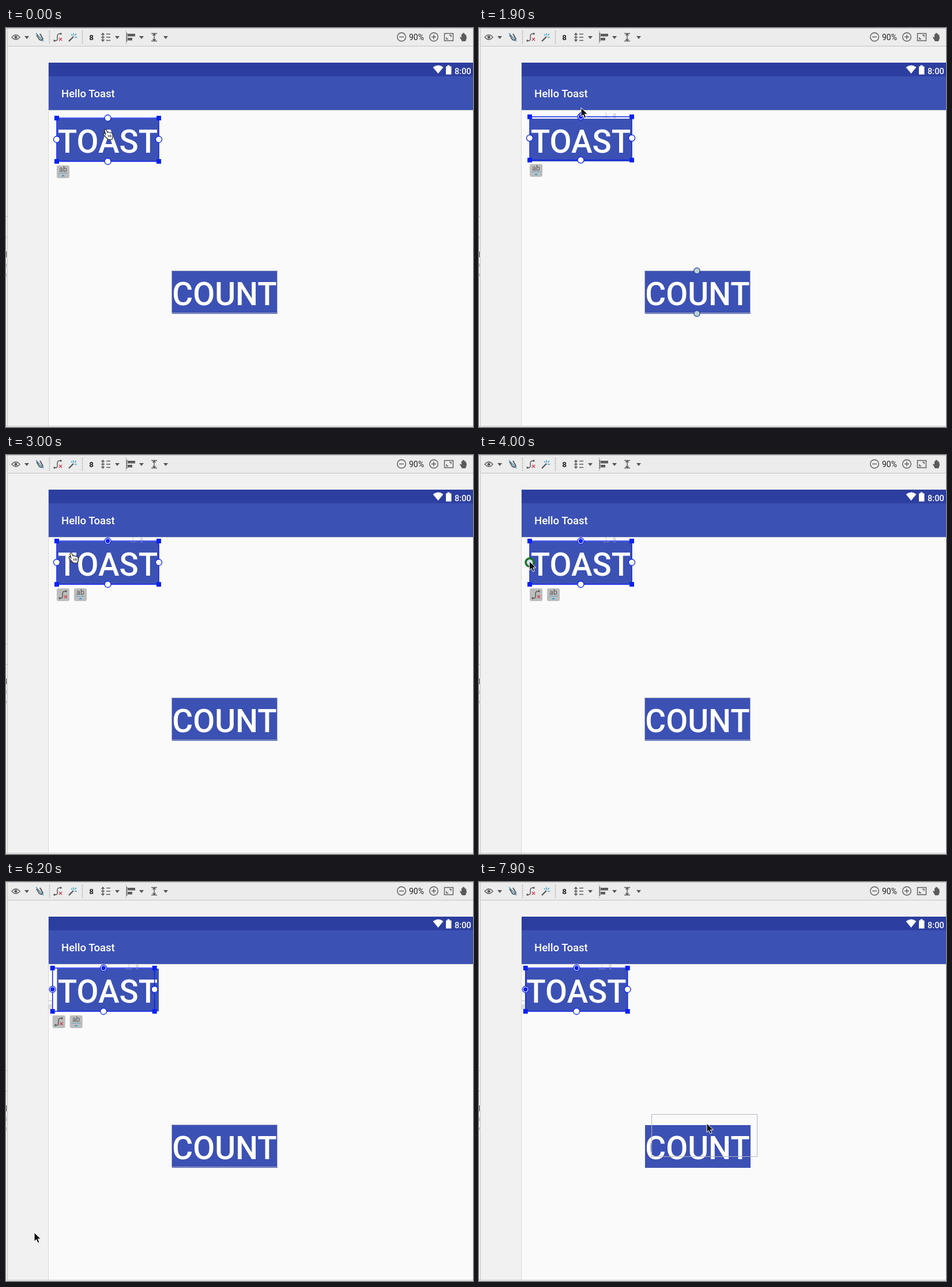
Recreate the animation shown at these times as an HTML page. Size 810 by 691 pixels, loop 8 s.

```html
<!DOCTYPE html>
<html lang="en">
<head>
<meta charset="utf-8">
<title>Layout editor</title>
<style>
  html, body { margin: 0; width: 100%; height: 100%; overflow: hidden; background: #f1f1f1; }
  svg { display: block; width: 100vw; height: 100vh; }
  text { font-family: Roboto, sans-serif; }
  .icon { fill: none; stroke: #5b5b5b; stroke-width: 1.4; }
  .dots { stroke: #777; stroke-dasharray: 1 2; }
  .label { font-size: 55px; font-weight: 500; fill: #fff; text-anchor: middle; }
  .hint { font-size: 11px; fill: #b9b9b9; text-anchor: middle; }
  .select { fill: none; stroke: #0a22f2; stroke-width: 1.5; }
</style>
</head>
<body>
<svg viewBox="0 0 810 691">
  <defs>
    <path id="caret" d="M-4 -2h8l-4 5z" fill="#555"/>
    <g id="unlink" fill="none" stroke-width="1.5">
      <path d="M-7 6h3c4 0 3-3 3-6s0-6 4-6h2" stroke="#5b5b5b"/>
      <circle cx="-6" cy="6" r="1" stroke="#5b5b5b"/><circle cx="5" cy="-6" r="1" stroke="#5b5b5b"/>
      <path d="M2 1l5 5m0-5l-5 5" stroke="#cf4457"/>
    </g>
    <g id="tile"><rect width="22" height="22" rx="3" fill="#bdbdbd"/></g>
  </defs>

  <!-- editor frame -->
  <rect width="810" height="691" fill="#f1f1f1"/>
  <rect width="810" height="31" fill="#ececec"/>
  <path d="M0 .5h810M2 31.5h808M2.5 0v690M0 689.5h810" stroke="#c4c4c4"/>
  <rect y="690" width="810" height="1" fill="#f4f4f4"/>
  <path d="M0 326.5h2M0 362.5h2" stroke="#bbb"/>
  <path d="M.5 387v10" stroke="#333"/>
  <path d="M.5 408v6M.5 425v5" stroke="#a9a9b8"/>

  <!-- toolbar -->
  <g class="icon">
    <path d="M10 16q7-8 14 0q-7 8-14 0z"/><circle cx="17" cy="16" r="1.8" fill="#5b5b5b"/>
    <path d="M53 12l5 8q4 3 6-1l-5-9M59 10l5 9" stroke-width="2"/><path d="M52 9l13 14" stroke="#3d8fb8"/>
    <path class="dots" d="M75.5 5v22M132.5 5v22M208.5 5v22"/>
    <path d="M109 23l8-8" stroke-width="2.4"/>
    <path d="M117 9v4M122 10l-3 3M119 16h4M113 11l2 2" stroke="#3d9fc4"/>
    <path d="M168 9v14M165.500 12l2.500-3 2.500 3M165.500 20l2.500 3 2.500-3M165 16h6M174 10.500h7M174 16h7M174 21.500h7"/>
    <path d="M209.500 8v16"/>
    <path d="M252 9.500h10M252 22.500h10M257 10v12M254.500 13l2.500-3 2.500 3M254.500 19l2.500 3 2.500-3"/>
    <circle cx="686" cy="15.500" r="7.300"/><path d="M682 15.500h8"/>
    <circle cx="742" cy="15.500" r="7.300"/><path d="M738 15.500h8M742 11.500v8"/>
    <rect x="760.500" y="9.500" width="15" height="12.500"/><path d="M764 16v3h3M769 12.500h3v3"/>
  </g>
  <path d="M211 10h13v4.500h-13zM211 17h8v4.500h-8z" fill="#5b5b5b"/>
  <path d="M791 23q-3-5-4-7q1-2 3 1v-6q1-1.500 2 0v-2q1-1.500 2 0v1q1-1.500 2 0v2q2-1.500 2 0l1 5q-1 4-2 6z" fill="#5b5b5b"/>
  <use href="#caret" x="36" y="16"/><use href="#caret" x="193" y="16"/>
  <use href="#caret" x="235" y="16"/><use href="#caret" x="277" y="16"/>
  <use href="#unlink" x="90" y="16"/>
  <text x="148" y="20.500" font-size="13.500" font-weight="700" text-anchor="middle" fill="#222">8</text>
  <text x="699" y="20.500" font-size="14" fill="#222">90%</text>

  <!-- device -->
  <rect x="73" y="60" width="1" height="629" fill="#d9d9d9"/>
  <rect x="74" y="60" width="736" height="629" fill="#fafafa"/>
  <rect x="74" y="60" width="736" height="24" fill="#2c3e9f"/>
  <rect x="74" y="83.500" width="736" height="58.500" fill="#3c51b4"/>
  <rect x="74" y="142" width="736" height="1" fill="#d4d4d8"/>
  <path d="M740.500 68q9.500-7 18 0l-9 11z" fill="#fff"/>
  <path d="M763 66.500h2.500v-2h4v2h3v14h-9.500z" fill="#fff"/>
  <text x="778" y="80" font-size="14.600" font-weight="500" fill="#fff">8:00</text>
  <text x="96" y="120" font-size="18.500" font-weight="500" fill="#fff">Hello Toast</text>

  <rect x="288" y="421" width="183" height="74" fill="#3c51b4"/>
  <text class="label" x="379" y="479.500">COUNT</text>
  <rect id="outline" x="287.500" y="420.500" width="183" height="73" fill="none" stroke="#b4b6c4"/>
  <g id="toast">
    <rect width="176.500" height="74" fill="#3c51b4"/>
    <text class="label" x="88" y="59">TOAST</text>
  </g>

  <!-- selection, relative to its top left corner -->
  <g id="selection">
    <g id="topMargin">
      <path d="M132.500 -7v8M127 1h11" stroke="#c4c4c4" fill="none"/>
      <text class="hint" x="147" y="2">8</text>
    </g>
    <g id="leftMargin">
      <path d="M-7 56.500h7" stroke="#c4c4c4"/>
      <text class="hint" x="-4" y="71">8</text>
    </g>
    <rect class="select" width="177" height="75"/>
    <path d="M-4 -4h8v8h-8zM173 -4h8v8h-8zM-4 71h8v8h-8zM173 71h8v8h-8z" fill="#0a22f2"/>
    <g id="handles"></g>
    <g id="actions">
      <g id="unlinkAction"><use href="#tile"/><use href="#unlink" x="11" y="11"/></g>
      <g id="textAction">
        <use href="#tile"/>
        <text x="11" y="11" font-size="12" text-anchor="middle" fill="#555">ab</text>
        <path d="M3 13.500h16" stroke="#3a9fc6" stroke-dasharray="2 1"/>
        <path d="M8 19h6l-3-3z" fill="#2b9fd0"/>
      </g>
    </g>
  </g>
  <g id="anchors" stroke="#2338b8" stroke-width="1.200">
    <g id="vertical"><circle cx="378" cy="420.500" r="5.200"/><circle cx="378" cy="494.500" r="5.200"/></g>
    <g id="horizontal"><circle cx="287" cy="457" r="5.200"/><circle cx="470.500" cy="457" r="5.200"/></g>
  </g>
  <path id="wire" class="select"/>

  <g id="cursor" stroke="#fff" stroke-linejoin="round">
    <path id="arrow" d="M0 0v15.500l3.600-3.300 2.500 5.800 2.900-1.200-2.500-5.600h5z" fill="#111"/>
    <path id="hand" d="M-2 9L-4 2q0-3 3-2l2 5 1-1 2 1 2 0 1 1 2 0q2 3 1 7l-1 4h-7l-4-4-4-5q0-3 3-1z"
          fill="#fff" stroke="#222" stroke-width="1.200"/>
    <path id="knuckles" d="M2 9l1 4M5 9l0 4M7 9l0 4" stroke="#222" fill="none"/>
  </g>
</svg>
<script>
const LOOP = 8000, STEP = 100;
const $ = id => document.getElementById(id);
const show = (id, on) => { $(id).style.display = on ? "" : "none"; };
const move = (id, x, y) => $(id).setAttribute("transform", `translate(${x} ${y})`);
const within = (t, from, to) => t >= from && t < to;
const ramp = (t, from, to) => Math.min(1, Math.max(0, (t - from) / (to - from)));

// time, x, y of the pointer tip
const PATH = [
  [0, 175, 176], [100, 175, 176], [900, 176, 155], [1300, 176, 154], [1600, 177, 126],
  [1900, 177, 138], [2300, 175, 142], [3000, 115, 170], [3700, 89, 184], [4100, 87, 184],
  [4500, 71, 184], [4700, 71, 184], [4900, 73, 230], [5300, 80, 700], [6100, 80, 700],
  [6200, 49, 607], [6900, 383, 437], [7600, 383, 437], [7900, 395, 418]
];

function pointer(t) {
  const i = Math.max(1, PATH.findIndex(p => p[0] >= t));
  const [t0, x0, y0] = PATH[i - 1], [t1, x1, y1] = PATH[i];
  let k = ramp(t, t0, t1);
  k = k * k * (3 - 2 * k);
  return [x0 + (x1 - x0) * k, y0 + (y1 - y0) * k];
}

function handle(x, y, linked, hot) {
  if (hot) return `<circle cx="${x}" cy="${y}" r="7" fill="#cfdcf0" stroke="#19751f" stroke-width="3.5"/>`;
  return `<circle cx="${x}" cy="${y}" r="5.5" fill="#fff" stroke="#0a22f2" stroke-width="1.3"/>` +
    (linked ? `<circle cx="${x}" cy="${y}" r="3.7" fill="#0a22f2"/>` : "");
}

function draw(t) {
  const [px, py] = pointer(t);
  const x = 88 - 7.3 * ramp(t, 4400, 4700), y = 156 - 7 * ramp(t, 1800, 2100);
  const topLinked = t >= 1800, leftLinked = t >= 4500;

  move("selection", x, y);
  move("toast", t < 6600 ? 88.5 : 81, t < 2300 ? 157 : 150);
  $("handles").innerHTML =
    handle(88.5, 0, topLinked, within(t, 700, 1800)) +
    handle(0, 37, leftLinked, within(t, 3600, 4500)) +
    handle(177, 37) + handle(88.5, 75);
  show("topMargin", topLinked);
  show("leftMargin", leftLinked);

  const unlinkable = t >= 2200;
  show("unlinkAction", unlinkable);
  move("unlinkAction", 0, 82);
  move("textAction", unlinkable ? 30 : 0, 82);
  show("actions", t < 6900);

  // possible targets pulse between dark and pale green
  const pale = 0.5 - 0.5 * Math.cos((t - 4700) / 800 * 2 * Math.PI);
  $("anchors").setAttribute("fill", `rgb(${10 + 175 * pale},${95 + 118 * pale},${15 + 187 * pale})`);
  show("vertical", within(t, 1400, 2100));
  show("horizontal", within(t, 4100, 4900));

  const pullUp = within(t, 1400, 2000);
  show("wire", pullUp || within(t, 4100, 4500));
  $("wire").setAttribute("d", pullUp
    ? `M176.500 ${y - 5}V${py + 8}m-3 4l3-4 3 4`
    : `M${x - 5} 186H${px}`);

  const lift = ramp(t, 7600, 7900);
  move("outline", 12 * lift, -18 * lift);

  const pointing = t < 600 || within(t, 2600, 3500) || within(t, 6700, 6900);
  move("cursor", px, py);
  show("arrow", !pointing);
  show("hand", pointing);
  show("knuckles", pointing);
}

function tick() {
  draw(Math.floor(performance.now() % LOOP / STEP) * STEP);
  requestAnimationFrame(tick);
}
tick();
</script>
</body>
</html>
```
